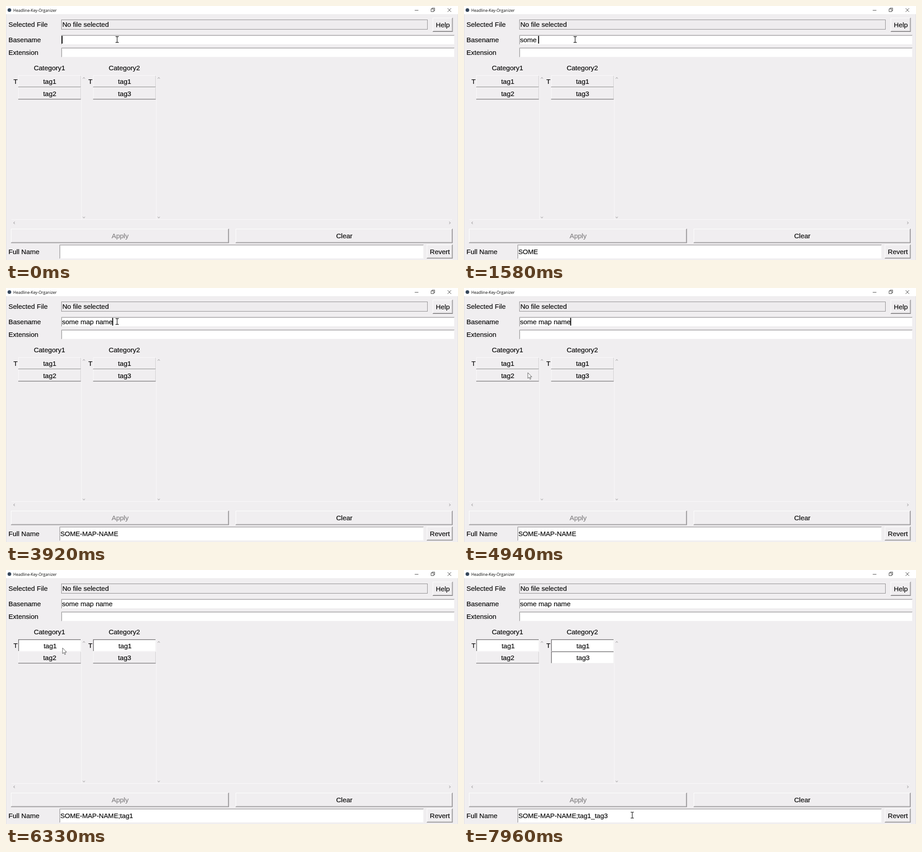
Recreate the animation shown at these times as an HTML page. Size 998 px wide and 561 px high, loop 8 s.

```html
<!DOCTYPE html>
<html lang="en">
<head>
<meta charset="utf-8">
<title>Tag form</title>
<style>
html, body { margin: 0; width: 100%; height: 100%; overflow: hidden; background: #f0eef0; }
svg { display: block; width: 100%; height: 100%; }
text { font: 15px "Liberation Sans", Arial, sans-serif; font-kerning: none; white-space: pre; fill: #080808; stroke: #080808; stroke-width: .2px; }
.mid { text-anchor: middle; }
.off { fill: #838183; stroke: #838183; }
.title { font: 8.7px "Open Sans", "Noto Sans", sans-serif; stroke: none; }
.full { font-size: 14.75px; }
</style>
</head>
<body>
<svg id="stage" viewBox="0 0 998 561"></svg>
<script>
const LOOP = 8000;
const FACE = '#f0eef0', WHITE = '#ffffff', SHADE = '#a3a1a3', DARK = '#727072';
const stage = document.getElementById('stage');

function add(tag, attrs, parent = stage) {
  const el = document.createElementNS('http://www.w3.org/2000/svg', tag);
  for (const key in attrs) el.setAttribute(key, attrs[key]);
  parent.appendChild(el);
  return el;
}
const box = (x, y, w, h, fill, parent) => add('rect', { x, y, width: w, height: h, fill }, parent);
const line = (d, stroke, width = 1, parent) =>
  add('path', { d, stroke, 'stroke-width': width, fill: 'none' }, parent);

function label(str, x, y, cls = '', parent) {
  const el = add('text', { x, y, class: cls }, parent);
  el.textContent = str;
  return el;
}

// Bevelled button with its caption in the middle
function button(str, x, y, w, h, cls = '') {
  box(x, y, w, h, DARK);
  box(x, y, w - 1, h - 1, WHITE);
  box(x + 1, y + 1, w - 2, h - 2, SHADE);
  box(x + 1, y + 1, w - 3, h - 3, FACE);
  label(str, x + w / 2 + .3, y + h / 2 + 5.5, 'mid ' + cls);
}

function entry(x, y, w, h) {
  box(x, y, w, h, WHITE);
  line(`M${x + .5} ${y + h}V${y + .5}H${x + w}`, SHADE);
  line(`M${x + 1.5} ${y + h - 1}V${y + 1.5}H${x + w - 1}`, '#c9c8c9');
  line(`M${x + w - .5} ${y + 1}V${y + h - .5}H${x + 1}`, '#f7f6f7');
}

// Toggle button: a raised and a sunken version, one shown at a time
function toggle(str, x, y) {
  const up = add('g', {}), down = add('g', {});
  box(x, y, 139, 27, FACE, up);
  line(`M${x + .5} ${y + 26}V${y + .5}H${x + 138}`, '#fbfafb', 1, up);
  line(`M${x} ${y + 26}H${x + 138.5}`, '#858385', 1.6, up);
  line(`M${x + 138} ${y + 1}V${y + 26}`, '#cccacc', 1, up);
  label(str, x + 69.5, y + 19, 'mid', up);
  box(x, y, 139, 27, WHITE, down);
  line(`M${x + .8} ${y + 26}V${y + .8}H${x + 138}`, '#777577', 1.6, down);
  line(`M${x + 138.5} ${y + 1}V${y + 26.5}H${x + 1}`, '#e9e8e9', 1, down);
  label(str, x + 70.5, y + 19.7, 'mid', down);
  return on => {
    up.style.display = on ? 'none' : '';
    down.style.display = on ? '' : 'none';
  };
}

function chevron(x, y, angle) {
  add('path', { d: 'M-2.5 1.5L0 -1.2L2.5 1.5', fill: 'none', stroke: '#aaa8aa', 'stroke-width': 1.1,
    transform: `translate(${x} ${y}) rotate(${angle})` });
}

// Window frame
box(0, 0, 998, 561, FACE);
box(0, 0, 998, 18, WHITE);
line('M.5 18V561M997.5 18V561', '#e2e0e2');
add('circle', { cx: 7.5, cy: 9, r: 4, fill: '#35465a' });
label('Headline-Key-Organizer', 16, 12.7, 'title');
line('M902.5 9.5H910.5M938.5 6.5H944.5V12.5H938.5ZM940.5 6V4.5H946.5V10.5H945', '#333', .9);
line('M975 5L983 13M983 5L975 13', '#333', .9);

// Form fields
label('Selected File', 5.5, 46);
box(122, 30, 809, 22, '#eeecee');
add('rect', { x: 122.5, y: 30.5, width: 808, height: 21, fill: 'none', stroke: '#8d8b8d' });
label('No file selected', 124.5, 46);
button('Help', 942, 26, 44.5, 31);
label('Basename', 5.5, 80);
entry(122, 64, 868, 21);
label('Extension', 5.5, 108);
entry(122, 92, 868, 21);

// Categories
const columns = [['Category1', 27, 'tag1', 'tag2'], ['Category2', 192.3, 'tag1', 'tag3']];
const [[tagA], [tagB, tagC]] = columns.map(([name, x, first, second]) => {
  label(name, x + 69, 142, 'mid');
  label('T', x - 10.5, 172);
  line(`M${x + 139.5} 153V471`, '#faf9fa');
  chevron(x + 145, 159, 0);
  chevron(x + 145, 467, 180);
  const pair = [toggle(first, x, 153), toggle(second, x, 179.7)];
  pair.forEach(set => set(false));
  return pair;
});
line('M12 471.5H985', '#faf9fa');
chevron(18, 479, -90);
chevron(980, 479, 90);

// Bottom rows
button('Apply', 11, 492, 481.2, 31.5, 'off');
button('Clear', 507, 492, 479.2, 31.5);
label('Full Name', 5.5, 548);
entry(118, 527, 804, 31);
button('Revert', 929, 527, 57.3, 30.7);

const baseText = label('', 123.7, 80);
const fullText = label('', 119.9, 547.7, 'full');
const caret = box(0, 66, 2, 17, '#000');
const beam = line('M-3.5 -6.5H-1Q0 -6.5 0 -5.5Q0 -6.5 1 -6.5H3.5M0 -6V6M-3.5 6.5H-1Q0 6.5 0 5.5Q0 6.5 1 6.5H3.5', '#222', 1.3);
const arrow = add('path', { d: 'M0 0V12.6L2.9 10L4.8 14.6L6.8 13.7L4.9 9.3H8.8Z',
  fill: '#fff', stroke: '#444', 'stroke-width': .9 });

// Timeline
const PHRASE = 'some map name';
const KEYS = [260, 500, 770, 1100, 1550, 2030, 2210, 2390, 2960, 3050, 3140, 3230, 3330];
const CLICK_1 = 6110, CLICK_2 = 7180;
const BLINK = 810, BLINK_OFF = 270, BLINK_START = 410;
const PATH = [[4610, 245.4, 74], [4930, 141, 187], [5300, 139, 188], [5810, 158, 171],
  [6060, 119, 171], [6240, 119, 171], [6960, 253.5, 196], [7290, 253.5, 196], [7900, 369, 543], [7960, 371.5, 541.4]];

const pen = document.createElement('canvas').getContext('2d');
pen.font = '15px "Liberation Sans", Arial, sans-serif';
pen.fontKerning = 'none';

function pointerAt(t) {
  if (t <= PATH[0][0]) return PATH[0].slice(1);
  const i = PATH.findIndex(p => p[0] > t);
  if (i < 0) return PATH[PATH.length - 1].slice(1);
  const [t0, x0, y0] = PATH[i - 1], [t1, x1, y1] = PATH[i];
  const u = (t - t0) / (t1 - t0), k = u * u * (3 - 2 * u);
  return [x0 + (x1 - x0) * k, y0 + (y1 - y0) * k];
}

const within = (x, y, l, t, r, b) => x >= l && x < r && y >= t && y < b;
const overEntry = (x, y) => within(x, y, 122, 64, 990, 85) ||
  within(x, y, 122, 92, 990, 113) || within(x, y, 118, 527, 922, 558);

function render(t) {
  const typed = PHRASE.slice(0, KEYS.filter(k => k <= t).length);
  const one = t >= CLICK_1, two = t >= CLICK_2;
  baseText.textContent = typed;
  fullText.textContent = typed.trim().toUpperCase().replace(/ /g, '-') +
    (one ? ';tag1' : '') + (two ? '_tag3' : '');
  tagA(one);
  tagB(one);
  tagC(two);

  const phase = (t - BLINK_START + BLINK) % BLINK;
  caret.setAttribute('x', 122.8 + pen.measureText(typed).width);
  caret.style.display = phase < BLINK_OFF ? 'none' : '';

  const [x, y] = pointerAt(t), text = overEntry(x, y);
  const place = `translate(${x} ${y})`;
  beam.setAttribute('transform', place);
  arrow.setAttribute('transform', place);
  beam.style.display = text ? '' : 'none';
  arrow.style.display = text ? 'none' : '';
}

const start = performance.now();
function tick() {
  render((performance.now() - start) % LOOP);
  requestAnimationFrame(tick);
}
tick();
</script>
</body>
</html>
```
